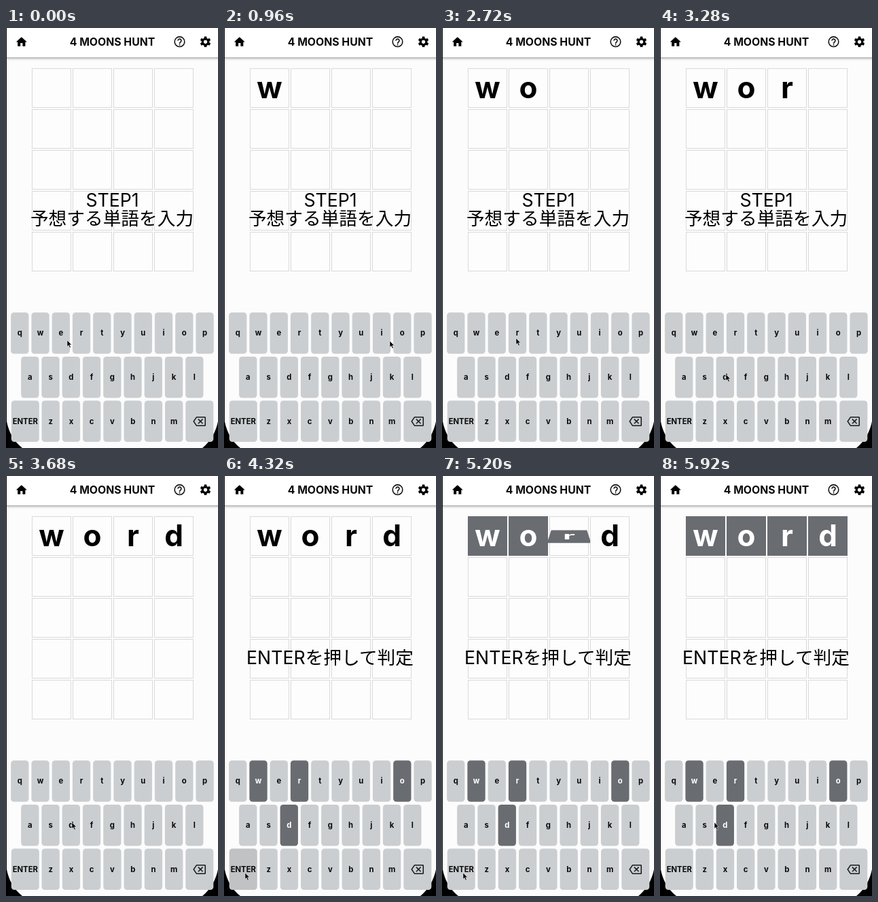
An HTML page for the animation above (6000 ms loop, 312 by 616 pixels).

```html
<!DOCTYPE html>
<html lang="ja">
<head>
<meta charset="utf-8">
<title>Word game</title>
<style>
html, body { margin: 0; width: 100%; height: 100%; overflow: hidden; background: #000; }
svg { display: block; width: 100%; height: 100%; }
text { font-family: Inter, sans-serif; font-weight: 700; text-anchor: middle; fill: #0a0a0a; }
.title { font-size: 15.8px; }
.key { font-size: 11.3px; }
.letter { font-size: 44px; }
.caption text { font: 500 26.7px "Noto Sans CJK JP", "Noto Sans CJK", sans-serif; fill: #000; stroke: #fff; stroke-width: 2px; paint-order: stroke; stroke-linejoin: round; }
.caption .latin { font-family: Inter, sans-serif; font-weight: 400; }
</style>
</head>
<body>
<svg id="stage" viewBox="0 0 312 616">
  <defs>
    <linearGradient id="shade" x2="0" y2="1">
      <stop offset="0" stop-color="#000" stop-opacity=".34"/>
      <stop offset=".4" stop-color="#000" stop-opacity=".13"/>
      <stop offset="1" stop-color="#000" stop-opacity="0"/>
    </linearGradient>
  </defs>
  <path d="M1 0H312V577Q307 601 289 616H24Q6 602 1 577Z" fill="#fcfcfc"/>
  <rect x="1" width="311" height="43" fill="#fff"/>
  <rect x="1" y="43" width="311" height="5" fill="url(#shade)"/>
  <path transform="translate(13.2 10.8) scale(.8)" d="M10 20v-6h4v6h5v-8h3L12 3 2 12h3v8z"/>
  <text class="title" x="156.5" y="26">4 MOONS HUNT</text>
  <g fill="none" stroke="#111" stroke-width="1.6">
    <circle cx="255.5" cy="20.2" r="7.3"/>
    <path d="M253.1 18.6a2.4 2.4 0 1 1 4.2 1.5c-.9 1-1.8 1.3-1.8 2.8M255.5 23.7v1.7"/>
  </g>
  <g id="gear" transform="translate(293.5 20.3)"></g>
  <g id="grid" fill="#fdfdfd" stroke="#dadada"></g>
  <g id="word"></g>
  <g id="keys"></g>
  <path transform="translate(275.3 567.6) scale(.78)" fill="#1a1a1a" d="M22 3H7c-.69 0-1.23.35-1.59.88L0 12l5.41 8.11c.36.53.9.89 1.59.89h15c1.1 0 2-.9 2-2V5c0-1.1-.9-2-2-2zm0 16H7.07L2.4 12l4.66-7H22v14zm-11.59-2L14 13.41 17.59 17 19 15.59 15.41 12 19 8.41 17.59 7 14 10.59 10.41 7 9 8.41 12.59 12 9 15.59z"/>
  <g id="step" class="caption">
    <text class="latin" x="156.5" y="262">STEP1</text>
    <text x="156" y="289">予想する単語を入力</text>
  </g>
  <g id="enter" class="caption">
    <text x="156" y="275.5"><tspan class="latin">ENTER</tspan>を押して判定</text>
  </g>
  <path id="cursor" d="M0 0V9.2L2.1 7.3 3.7 11 5.3 10.3 3.7 6.7H6.6Z" fill="#000" stroke="#fff" stroke-width=".5"/>
</svg>
<script>
const LOOP = 6000, STEP = 80;
const CELL = 57, PITCH = 60, LEFT = 38.5, TOP = 59.5;
const DARK = '#696c71', KEY = '#cbced1';
const FLIP_START = 4320, FLIP = 338, DEPTH = 260;
const POP = 100;
const typed = [468, 1265, 2872, 3475];
const path = [
  [0, 90, 458], [320, 54, 459], [560, 54, 459], [800, 165, 460], [960, 244, 459],
  [1120, 256, 459], [1360, 256, 459], [1760, 210, 459], [1920, 210, 459],
  [2160, 93, 458], [2320, 93, 458], [2720, 109, 455], [2880, 109, 455],
  [3120, 84, 490], [3280, 97, 508], [3680, 97, 508], [4080, 32, 580],
  [4160, 31, 582], [5280, 31, 582], [5520, 78, 521], [5760, 87, 508],
  [5840, 87, 508], [5920, 80, 508], [6000, 80, 508]
];

const $ = id => document.getElementById(id);

function add(parent, tag, attrs, text) {
  const el = document.createElementNS('http://www.w3.org/2000/svg', tag);
  for (const k in attrs) el.setAttribute(k, attrs[k]);
  if (text) el.textContent = text;
  return parent.appendChild(el);
}

function addKey(label, cx, y, w) {
  const rect = add($('keys'), 'rect', { x: cx - w / 2, y, width: w, height: 60.5, rx: 4.5, fill: KEY });
  const text = add($('keys'), 'text', { class: 'key', x: cx, y: y + 34 }, label);
  return { rect, text };
}

for (let i = 0; i < 6; i++)
  add($('gear'), 'rect', { x: -1.9, y: -7.8, width: 3.8, height: 5, rx: .5, transform: `rotate(${i * 60})` });
add($('gear'), 'circle', { r: 4.3, fill: 'none', stroke: '#000', 'stroke-width': 3.2 });

for (let i = 0; i < 20; i++)
  add($('grid'), 'rect', { x: LEFT + i % 4 * PITCH, y: TOP + (i >> 2) * PITCH, width: CELL, height: CELL });

const keys = {};
[['qwertyuiop', 20.3, 417.3], ['asdfghjkl', 35.3, 482], ['zxcvbnm', 65.7, 546.5]].forEach(([row, x, y]) =>
  [...row].forEach((c, i) => keys[c] = addKey(c, x + i * 30.25, y, 26.3)));
const enterKey = addKey('ENTER', 28.3, 546.5, 41);
addKey('', 284.8, 546.5, 41);

const tiles = [...'word'].map((c, i) => {
  const g = add($('word'), 'g', {});
  return {
    g, cx: LEFT + i * PITCH + CELL / 2, cy: TOP + CELL / 2,
    face: add(g, 'polygon', {}),
    text: add(g, 'text', { class: 'letter', y: 14.5 }, c)
  };
});

const clamp = v => Math.max(0, Math.min(1, v));

function cursorAt(t) {
  const i = Math.max(1, path.findIndex(p => p[0] >= t));
  const [a, b] = [path[i - 1], path[i]];
  const u = (t - a[0]) / (b[0] - a[0]);
  return [a[1] + (b[1] - a[1]) * u, a[2] + (b[2] - a[2]) * u];
}

function drawTile(tile, i, t) {
  const age = t - typed[i];
  tile.g.setAttribute('visibility', age >= 0 ? 'visible' : 'hidden');
  const pop = 1 + .28 * Math.sin(Math.PI * clamp(age / POP));
  tile.g.setAttribute('transform', `translate(${tile.cx} ${tile.cy}) scale(${pop})`);

  // The top edge swings towards the viewer and down.
  const angle = Math.PI * clamp((t - FLIP_START) / FLIP - i);
  const back = angle > Math.PI / 2;
  const half = CELL / 2 + (back ? .5 : 0);
  const squash = Math.abs(Math.cos(angle));
  const lean = half * Math.sin(angle) * (back ? -1 : 1);
  const near = DEPTH / (DEPTH - lean), far = DEPTH / (DEPTH + lean);
  const [wt, wb] = [half * near, half * far];
  const [yt, yb] = [-wt * squash, wb * squash];
  tile.face.setAttribute('points', `${-wt},${yt} ${wt},${yt} ${wb},${yb} ${-wb},${yb}`);
  tile.face.setAttribute('fill', back ? DARK : '#fdfdfd');
  tile.face.setAttribute('stroke', back ? 'none' : '#dadada');
  tile.text.setAttribute('transform', `scale(1 ${squash})`);
  tile.text.style.fill = back ? '#fff' : '#000';
}

function draw(t) {
  tiles.forEach((tile, i) => drawTile(tile, i, t));
  const judged = t >= FLIP_START;
  for (const c of 'word') {
    keys[c].rect.setAttribute('fill', judged ? DARK : KEY);
    keys[c].text.style.fill = judged ? '#fff' : '';
  }
  enterKey.rect.setAttribute('fill', judged && t < 4560 ? '#c0c2c4' : KEY);
  $('step').setAttribute('visibility', t < 3520 ? 'visible' : 'hidden');
  $('enter').setAttribute('visibility', t >= 3840 ? 'visible' : 'hidden');
  $('cursor').setAttribute('transform', `translate(${cursorAt(t)})`);
}

const start = performance.now();
function tick() {
  const t = (performance.now() - start) % LOOP;
  draw(Math.floor(t / STEP) * STEP);
  requestAnimationFrame(tick);
}
tick();
</script>
</body>
</html>
```
